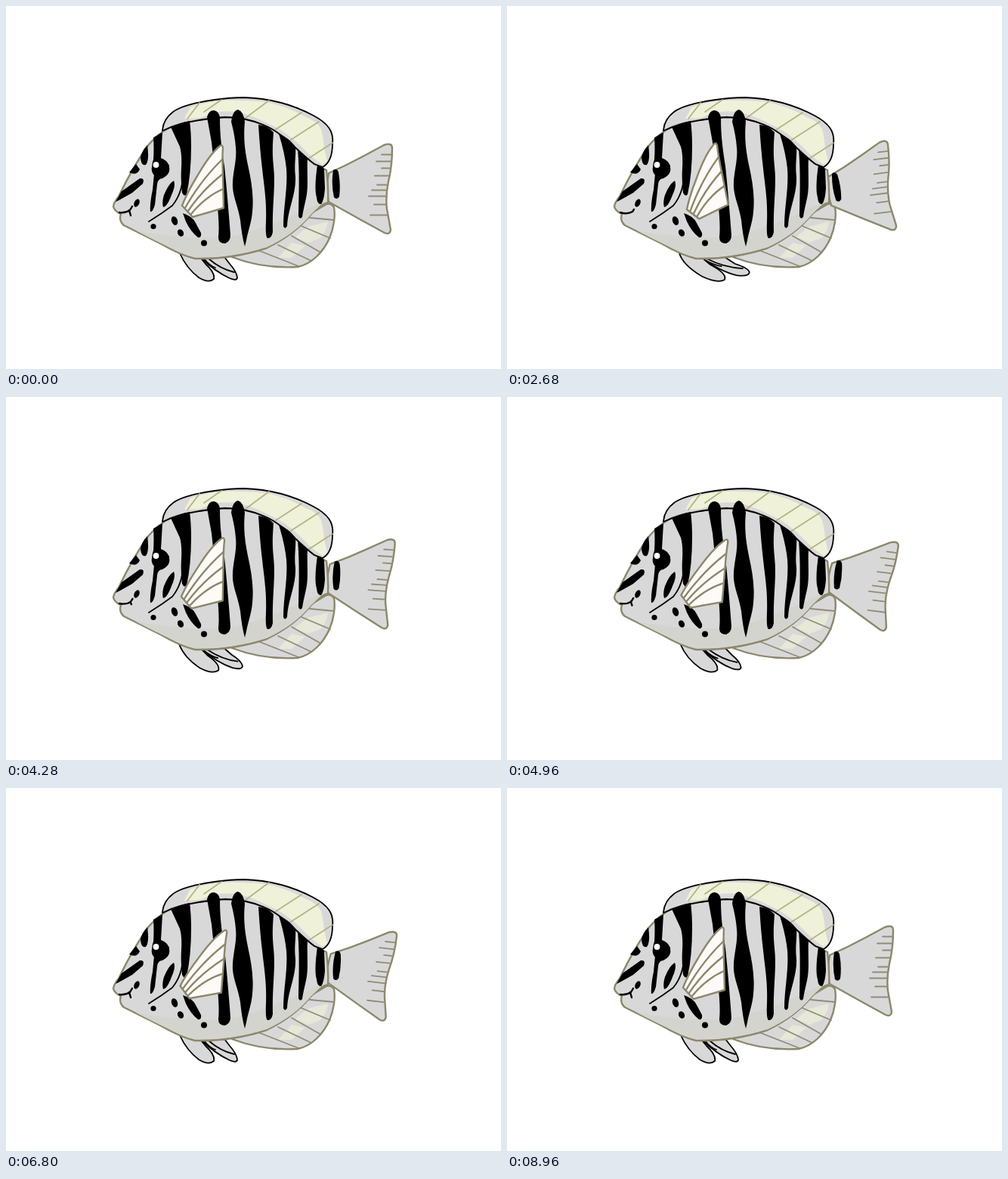
An HTML page that plays this animation: 655 px wide and 480 px high, repeating every 9 s.

```html
<!DOCTYPE html>
<html lang="en">
<head>
<meta charset="utf-8">
<title>Striped fish</title>
<style>
html, body { margin: 0; width: 100%; height: 100%; overflow: hidden; background: #fff; }
svg { display: block; width: 655px; height: 480px; }
path { stroke-linejoin: round; stroke-linecap: round; }
.skin { fill: #d9d8d9; }
.olive { stroke: #8b886b; stroke-width: 2.4; }
.ray { fill: none; stroke: #b4b287; stroke-width: 1.8; }
.dark { stroke: #908d74; }
.pale { fill: #eff2d8; }
.ink { stroke: #000; stroke-width: 1.8; }
.line { fill: none; }
</style>
</head>
<body>
<svg viewBox="0 0 655 480">
  <!-- dorsal fin -->
  <path class="skin ink" d="M207 164C208 153 213 146 221 140C233 131 255 127 276 124C290 122 303 121 315 121C350 122 381 131 407 145C426 155 434 166 432 182C432 196 428 208 419 213L390 222 220 190Z"/>
  <path class="pale" d="M236 149L244 134Q262 127 288 125Q312 124 345 127Q375 134 395 146Q413 153 417 163Q420 174 421 188L425 205 419 210Q405 201 391 186Q370 165 350 157Q328 145 306 140Q278 137 257 148Z"/>
  <path class="ray" d="M240 149L256 128M262 140L285 124M317 148L348 125M354 165L391 141M372 180L414 153M398 203L432 181"/>

  <!-- anal fin -->
  <path class="skin olive" d="M299 332C325 342 352 347 386 345C405 341 420 325 428 307C434 293 436 277 434 266Q430 260 424 262L360 300Z"/>
  <path fill="#e6e8d8" d="M382 306L399 292 426 285Q425 297 416 307L400 313ZM360 333L378 313 396 317 378 333Z"/>
  <path class="ray dark" d="M402 280L434 283M391 291L429 307M378 304L415 325M360 316L404 337M331 322L387 344"/>

  <g class="skin ink">
    <path id="pelvicB"/>
    <path id="pelvicRay" class="line"/>
    <path id="pelvicA"/>
  </g>

  <g id="tail">
    <path class="skin olive" d="M427 221Q450 211 474 198L500 184Q511 180 511 188Q511 212 506 232Q502 252 504 268L509 296Q508 303 501 300L470 283 427 259Q423 240 427 221Z"/>
    <path d="M433 217Q438 214 440 220Q443 236 441 252Q438 257 434 253Q430 235 433 217Z"/>
    <path class="ray dark" d="M497 196.500H510M490 205.500H510M497 214.500H509M488 224.500H507M491 236.500H505M484 243.500H504M480 251.500H503M487 262.500H503M482 276.500H505"/>
  </g>

  <!-- body -->
  <path class="skin olive" d="M142 265Q143 259 149 252C160 229 173 205 189 183Q202 168 218 160Q246 150 290 147Q316 147 340 157C368 168 385 192 408 209L424 217Q427 240 426 260Q416 262 404 275Q382 302 345 320Q300 335 250 334Q230 329 206 315L156 290Q149 284 152 275Q143 271 142 265Z"/>
  <path fill="#d4d4ce" d="M172 297Q230 308 292 306Q350 294 424 256L404 275Q382 302 345 319Q300 333 250 332Q225 325 172 297Z"/>
  <path class="line ink" d="M207 165Q236 151 290 147Q316 147 340 157C368 168 385 192 408 209L419 213"/>

  <!-- stripes -->
  <path d="M218 160Q231 154 243 152Q245 166 245 186Q245 222 239 249Q236 253 233 247Q231 232 232 214Q233 196 230 186Z
    M266 147Q268 138 275 138Q282 139 283 148C283 174 286 192 289 212Q293 250 297 303Q297 311 290 314Q281 314 281 306Q283 288 278 248Q275 207 272 180Z
    M298 153Q300 138 307 137Q314 139 316 153C314 175 316 190 320 210C325 232 328 252 326 272C325 286 320 298 318 310L316 318Q312 304 310 283C307 265 301 254 300 240C299 222 306 205 304 187Q303 172 298 153Z
    M334 157Q346 158 354 167C353 182 352 192 354 212C357 238 352 262 353 299Q351 308 346 307Q343 305 344 285C345 255 341 235 339 215Q336 190 334 157Z
    M361 169Q374 174 383 186C384 199 381 210 383 226C384 249 373 268 372 291Q369 296 367 291C367 265 373 242 371 215Q369 195 361 169Z
    M386 189L399 202C398 216 400 235 398 249C396 261 393 270 392 279Q389 283 387 278C387 256 389 225 386 189Z
    M412 210L421 215 422 241Q421 257 417 262Q412 263 411 253C408 243 410 225 412 210Z"/>

  <!-- face -->
  <path d="M187 184Q190 204 185 210Q179 212 178 201Q179 192 187 184Z
    M195 174L207 167Q206 185 205 201Q212 203 216 211Q216 224 207 228Q201 228 200 236L197 263Q194 273 191 272Q190 262 194 243L196 222Q191 214 195 203Q196 188 195 174Z
    M172 209L163 220Q173 225 177 216Z
    M153 245L177 228Q184 227 181 235L167 247 151 256 145 259Z
    M222 231Q225 237 219 250Q213 266 208 266Q206 260 209 250Q215 235 222 231Z
    M234 274Q247 278 251 287L258 300Q259 307 254 306Q244 298 238 285Z"/>
  <circle cx="204.500" cy="215.500" r="11.800"/>
  <circle cx="198.500" cy="210" r="3.900" fill="#fff"/>
  <ellipse cx="173" cy="260.500" rx="3.300" ry="5.600" transform="rotate(25 173 260.500)"/>
  <circle cx="195" cy="291.500" r="3.600"/>
  <ellipse cx="223" cy="284" rx="4" ry="6" transform="rotate(-20 223 284)"/>
  <ellipse cx="231" cy="300" rx="3.800" ry="5" transform="rotate(-30 231 300)"/>
  <circle cx="262" cy="313.500" r="4"/>
  <path class="line ink" d="M233 235Q230 252 220 264L206 274 189 285"/>
  <path class="line ink" id="mouth" style="stroke-width:2.400"/>

  <!-- pectoral fin -->
  <g id="pectoral">
    <path class="olive" fill="#fefaf8" d="M233 264Q240 246 253 225Q269 197 282 186Q286 182 287 187Q286 200 287 225L288 267 247 279Z"/>
    <path class="olive line" d="M237 267Q258 230 286 203M241 271Q260 243 287 222M245 275Q264 252 287 242"/>
  </g>
</svg>
<script>
const LOOP = 9000, TURN = 2640, PEAK = 6000, SETTLE = 5700;
const el = id => document.getElementById(id);
const easeOut = u => 1 - (1 - u) ** 1.5;
const mix = (a, b, u) => a + (b - a) * u;

// Each path: resting shape, then its shape at the end of the first stroke.
const morphs = {
  pelvicA: ["M230 327Q239 347 255 359Q268 367 275 361Q277 353 264 341L255 330Z",
            "M228 327Q233 343 259 358Q279 367 288 362Q292 354 269 342L256 331Z"],
  pelvicB: ["M258 333Q278 352 296 360Q306 364 306 359Q305 351 296 341L289 332Z",
            "M256 332Q282 351 304 356Q320 358 321 352Q319 346 302 341L288 332Z"],
  pelvicRay: ["M268 334Q284 348 302 352M262 334Q270 344 277 346",
              "M264 334Q288 346 312 347M258 334Q274 343 284 344"],
  mouth: ["M150 273Q158 274 164 270L167 265M163 270L165 277",
          "M150 273Q159 276 166 272L168 269M166 272L167 271"]
};

function morph(id, u) {
  const [from, to] = morphs[id];
  const ends = to.match(/\d+/g);
  let i = 0;
  el(id).setAttribute("d", from.replace(/\d+/g, n => mix(+n, +ends[i++], u).toFixed(2)));
}

// Three strokes: forward, full swing back, return to rest.
function swing(t, low, high) {
  if (t < TURN) return low * easeOut(t / TURN);
  if (t < PEAK) return mix(low, high, easeOut((t - TURN) / (PEAK - TURN)));
  return high * (1 - easeOut((t - PEAK) / (LOOP - PEAK)));
}

function pose(id, y, angle, cx, cy) {
  el(id).setAttribute("transform", `translate(0 ${y}) rotate(${angle} ${cx} ${cy})`);
}

function draw(now) {
  const t = Math.floor(now % LOOP / 40) * 40;
  pose("tail", swing(t, 0, 4.6), swing(t, -7.3, 10.4), 468, 243);
  pose("pectoral", swing(t, -0.8, 2.8), swing(t, -10.2, 9.6), 269, 238);
  const fold = t < TURN ? easeOut(t / TURN) : Math.max(0, 1 - (t - TURN) / (SETTLE - TURN));
  for (const id in morphs) morph(id, fold);
}

const start = performance.now();
function frame() {
  draw(performance.now() - start);
  requestAnimationFrame(frame);
}
frame();
</script>
</body>
</html>
```
